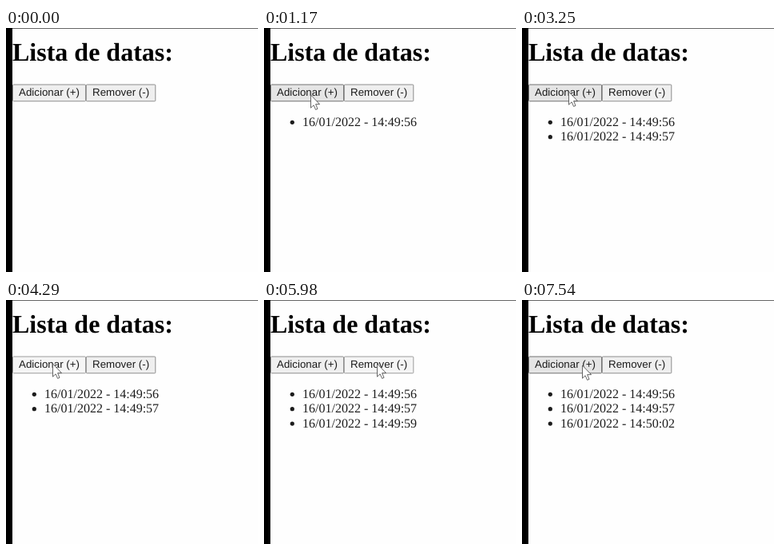
An HTML page that plays this animation: 315 px wide and 306 px high, repeating every 8000 ms.

```html
<!DOCTYPE html>
<html lang="pt">
<head>
<meta charset="utf-8">
<title>Lista de datas</title>
<style>
  html, body { margin: 0; width: 100%; height: 100%; overflow: hidden; background: #fefefe; }
  svg { display: block; width: 315px; height: 306px; }
  text { text-rendering: geometricPrecision; }
  .title { font: bold 32px "Liberation Serif", serif; }
  #list { font: 16px "Liberation Serif", serif; fill: #1c1c1c; }
  .button text { font: 13.333px "Liberation Sans", sans-serif; fill: #1c1c1c; }
  .button rect { fill: #efefef; stroke: #8c8c8c; }
  .hover rect { fill: #e5e5e5; stroke: #707070; }
  .press rect { fill: #f5f5f5; stroke: #9c9c9c; }
</style>
</head>
<body>
<svg viewBox="0 0 315 306">
  <rect x="8" width="307" height="1" fill="#666"/>
  <rect width="8" height="306"/>
  <text class="title" x="8" y="41">Lista de datas:</text>
  <g id="add">
    <rect x="8.5" y="71" width="91" height="20.8" rx="1"/>
    <text x="16" y="85">Adicionar (+)</text>
  </g>
  <g id="remove">
    <rect x="100.3" y="71" width="86.5" height="20.8" rx="1"/>
    <text x="108" y="85">Remover (-)</text>
  </g>
  <g id="list"></g>
  <path id="cursor" d="M.5 0V16.2L4.1 12.8L6.6 18.4L9 17.4L6.6 11.6H11.6Z"
        fill="#fff" stroke="#555" stroke-width=".9" stroke-linejoin="round"/>
</svg>
<script>
const LOOP = 8000, TICK = 130; // the screen refreshes once per tick
const $ = id => document.getElementById(id);

// The pointer eases to each stop, taking the given number of ticks.
const entry = { x: 96, y: 150 };
const stops = [
  { arrive: 5, ticks: 5, x: 58, y: 84 },
  { arrive: 18, ticks: 4, x: 60, y: 76 },
  { arrive: 25, ticks: 1, x: 58, y: 80 },
  { arrive: 40, ticks: 3, x: 141, y: 80 },
  { arrive: 51, ticks: 3, x: 75, y: 82 }
];
const clicks = [7, 21, 33, 46, 57];

const ease = p => p * p * (3 - 2 * p);
const mix = (a, b, p) => a + (b - a) * p;

function pointerAt(tick) {
  return stops.reduce((pos, { arrive, ticks, x, y }) => {
    const p = ease(Math.min(1, Math.max(0, 1 + (tick - arrive) / ticks)));
    return { x: mix(pos.x, x, p), y: mix(pos.y, y, p) };
  }, entry);
}

function buttonAt({ x, y }) {
  if (y < 71 || y > 92 || x < 8 || x > 187) return null;
  return x < 100 ? 'add' : 'remove';
}

function dateAt(tick) {
  const time = new Date(Date.UTC(2022, 0, 16, 14, 49, 55, 100) + tick * TICK);
  return '16/01/2022 - ' + time.toISOString().slice(11, 19);
}

// Each earlier click has added or removed one date.
function datesAt(tick) {
  return clicks.filter(c => c < tick).reduce((dates, c) =>
    buttonAt(pointerAt(c)) === 'add' ? [...dates, dateAt(c)] : dates.slice(0, -1), []);
}

function dateItem(date, i) {
  const y = 123 + i * 18.4;
  return `<circle cx="35.3" cy="${y - 4.7}" r="2.6"/><text x="48" y="${y}">${date}</text>`;
}

function draw(t) {
  const tick = Math.floor(t / TICK);
  const pointer = pointerAt(tick);
  const target = buttonAt(pointer);
  const state = clicks.includes(tick) ? 'press' : 'hover';
  for (const id of ['add', 'remove']) {
    $(id).setAttribute('class', 'button ' + (id === target ? state : ''));
  }
  $('list').innerHTML = datesAt(tick).map(dateItem).join('');
  $('cursor').style.display = tick > 0 ? '' : 'none';
  $('cursor').setAttribute('transform', `translate(${pointer.x} ${pointer.y})`);
}

const start = performance.now();
function frame() {
  draw((performance.now() - start) % LOOP);
  requestAnimationFrame(frame);
}
frame();
</script>
</body>
</html>
```
